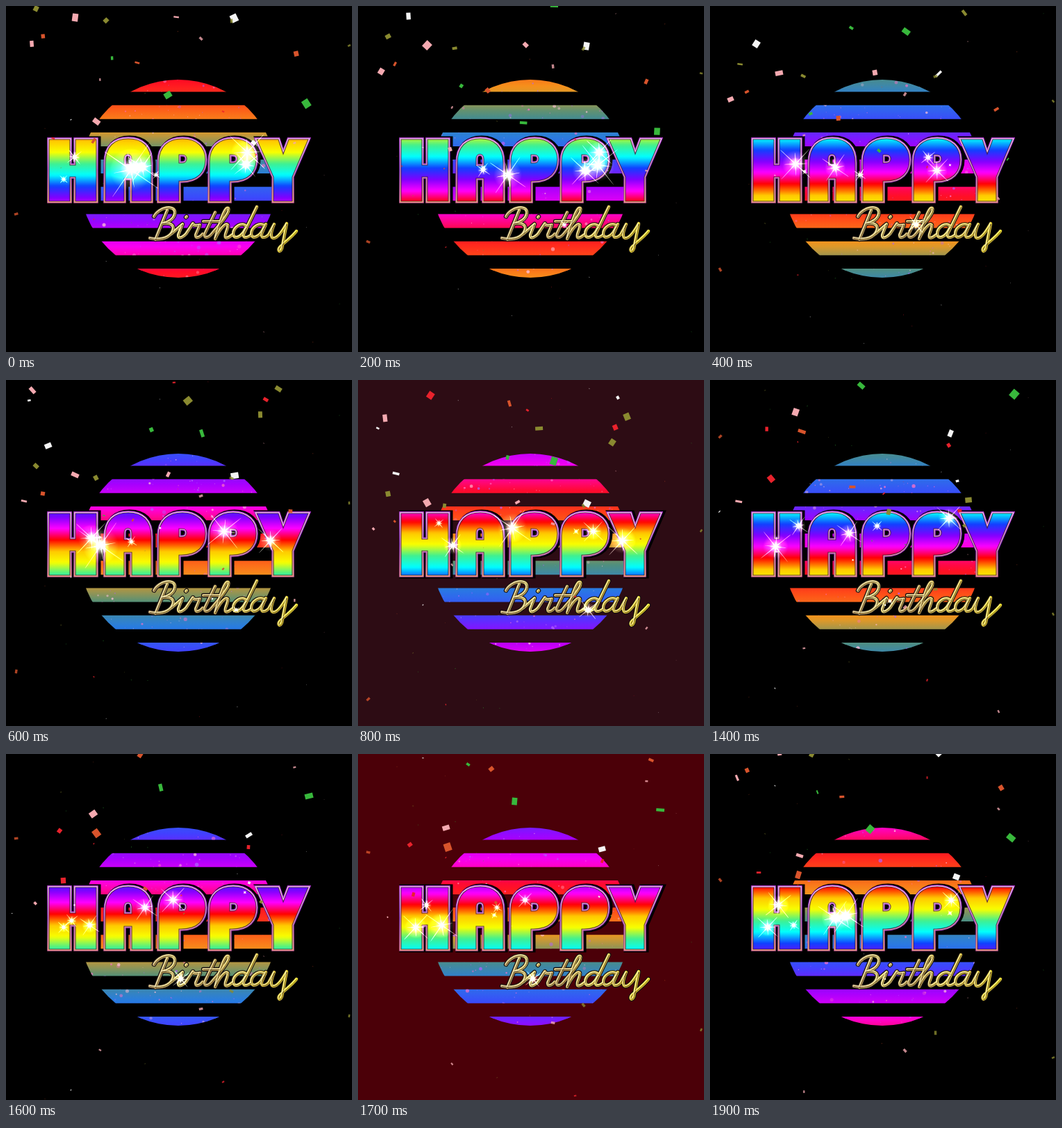
An HTML page with a canvas that plays this animation: 498 px wide and 498 px high, repeating every 2000 ms.

```html
<!DOCTYPE html>
<html lang="en">
<head>
<meta charset="utf-8">
<title>Happy Birthday</title>
<style>
  html, body { margin: 0; width: 100%; height: 100%; overflow: hidden; background: #000; }
  canvas { display: block; }
</style>
</head>
<body>
<canvas id="stage" width="498" height="498" role="img" aria-label="Happy Birthday"></canvas>
<script>
const SIZE = 498, STEP = 100, STEPS = 20, LOOP = STEP * STEPS;
const FALL = 400; // distance a piece of confetti falls in one loop
const ctx = document.getElementById('stage').getContext('2d');
const flashes = { 8: '#2d0c14', 17: '#4b0008' };

// Evenly spaced colours of one full cycle
const sunset = ['#ff0a24', '#ff4a18', '#f59a1c', '#50907a', '#287de1', '#3c44ff', '#a000ff', '#ff00f0'];
const rainbow = ['#ff0000', '#ffc800', '#f8ff00', '#40f090', '#00ffff', '#1040ff', '#8000ff', '#ff00ff'];
const paper = ['#f4a9b0', '#e8222c', '#8a8a30', '#38b83c', '#f4f4f4', '#d8542c'];
const glitter = ['#ff70c8', '#b060ff', '#ffc0d8'];

const happy = new Path2D(
  'M62 281V192H92V229H100V192H130V281H100V246H92V281Z' +
  'M143 281V226C143 202 156 191 176 191S209 202 209 226V281H181V248H170V281Z' +
  'M170 230H181V220C181 211 170 211 170 220Z');
const letterP = new Path2D(
  'M220 281V224C220 202 234 191 254 191S287 203 287 221S276 252 252 252H249V281Z' +
  'M249 226H254C262 226 262 214 254 214H249Z');
happy.addPath(letterP);
happy.addPath(letterP, new DOMMatrix().translate(73, 0));
happy.addPath(new Path2D('M361 192H392L399 213L407 192H435L412 246V281H385V246Z'));

const birthday = new Path2D(
  'M232 294L215 336M213 303C220 289 244 285 243 298C242 307 232 312 225 313' +
  'C240 311 244 318 238 327C232 335 220 337 207 334' +
  'M238 328L254 314L248 329C247 335 252 335 259 328M259 304L260 303' +
  'M259 328L269 313C270 317 275 316 279 315L273 329C272 335 278 334 283 328' +
  'M301 297L286 328C285 335 291 334 296 328M284 310H308' +
  'M296 328C307 315 324 296 320 291C315 287 307 313 301 335C307 322 316 311 319 315' +
  'C321 319 313 330 316 333C319 335 323 331 327 328' +
  'M346 317C340 310 327 318 327 328C328 337 339 333 345 320M361 289L342 328C341 335 347 334 353 329' +
  'M373 317C366 310 353 318 353 328C354 337 366 332 371 319M374 314L368 328C367 335 373 334 378 329' +
  'L386 314C380 328 381 335 386 334C392 333 399 322 404 313L397 349' +
  'C395 356 389 352 395 346C402 339 412 332 418 324');

const fract = v => v - Math.floor(v);

function randomizer(seed) {
  return () => fract(Math.sin(++seed * 12.9898) * 43758.5453);
}

function cycleColor(palette, position) {
  const p = fract(position) * palette.length;
  const i = Math.floor(p), k = p - i;
  const channel = (color, at) => parseInt(color.slice(at, at + 2), 16);
  const from = palette[i], to = palette[(i + 1) % palette.length];
  return `rgb(${[1, 3, 5].map(at => Math.round(channel(from, at) * (1 - k) + channel(to, at) * k))})`;
}

// Vertical slice of a palette that begins at the given phase and covers the given span
function cycleGradient(palette, top, bottom, phase, span) {
  const gradient = ctx.createLinearGradient(0, top, 0, bottom);
  for (let k = 0; k <= 1; k += 1 / 32) {
    gradient.addColorStop(k, cycleColor(palette, phase + span * k));
  }
  return gradient;
}

function linearGradient(x0, y0, x1, y1, colors) {
  const gradient = ctx.createLinearGradient(x0, y0, x1, y1);
  colors.forEach((color, i) => gradient.addColorStop(i / (colors.length - 1), color));
  return gradient;
}

function dot(x, y, radius) {
  ctx.beginPath();
  ctx.arc(x, y, radius, 0, 7);
}

function drawSun(t, frame) {
  const random = randomizer(frame * 977);
  ctx.save();
  ctx.beginPath();
  for (let i = 0; i < 8; i++) ctx.rect(100, 103.5 + i * 39.2, 298, 20);
  ctx.clip();
  dot(248, 248.5, 142.5);
  ctx.clip();
  ctx.fillStyle = cycleGradient(sunset, 106, 391, t / LOOP * 2, 1.03);
  ctx.fillRect(100, 100, 298, 298);
  for (let i = 0; i < 260; i++) {
    ctx.fillStyle = glitter[i % glitter.length];
    ctx.globalAlpha = .3 + random() * .5;
    dot(110 + random() * 276, 106 + random() * 285, .6 + random() ** 4 * 2.2);
    ctx.fill();
  }
  ctx.restore();
}

function drawHappy(t) {
  const outline = (width, style) => {
    ctx.lineWidth = width;
    ctx.strokeStyle = style;
    ctx.stroke(happy);
  };
  ctx.lineJoin = 'miter';
  ctx.save();
  ctx.translate(2, 0);
  outline(9, '#000');
  ctx.restore();
  outline(5.5, linearGradient(0, 188, 0, 284, ['#c040e0', '#7020b0', '#d060a0']));
  outline(3.2, linearGradient(0, 188, 0, 284, ['#ffe8f0', '#e8a0c8', '#ffc870']));
  ctx.fillStyle = cycleGradient(rainbow, 191, 281, .1 + t / LOOP * 2, .69);
  ctx.fill(happy, 'evenodd');
  outline(1.1, 'rgba(50,5,50,.75)');
}

function drawBirthday() {
  const gold = linearGradient(207, 0, 418, 0,
    ['#b89c68', '#e8d878', '#b89a58', '#f0dc60', '#d8c040', '#fff030']);
  const layer = (width, style, shift) => {
    ctx.save();
    ctx.translate(shift, shift);
    ctx.lineWidth = width;
    ctx.strokeStyle = style;
    ctx.stroke(birthday);
    ctx.restore();
  };
  ctx.lineCap = ctx.lineJoin = 'round';
  layer(6.4, '#120c10', 0);
  layer(4.2, gold, 0);
  layer(.9, '#58401c', .6);
  layer(.8, '#fffbd0', -.8);
}

function drawPiece(x, y, size, angle, flip, color) {
  ctx.save();
  ctx.translate(x, y);
  ctx.rotate(angle);
  ctx.fillStyle = color;
  ctx.fillRect(-size / 2, -size * flip / 2, size, size * flip);
  ctx.restore();
}

function drawConfetti(t) {
  const random = randomizer(41);
  const fallen = t / LOOP * FALL;
  for (let i = 0; i < 30; i++) {
    const y = (random() * FALL + fallen) % FALL - 15;
    const x = 30 + random() * 420 + (random() - .5) * y * .3;
    const size = 4 + random() * 8;
    const scale = Math.min(1, (250 - y) / 80);
    const turn = random() * 6 + y / 45;
    if (scale > 0) {
      drawPiece(x, y, size * scale, turn * .7, .3 + .6 * Math.abs(Math.cos(turn)), paper[i % paper.length]);
    }
  }
  // Distant specks
  for (let i = 0; i < 30; i++) {
    const x = random() * SIZE, y = (random() * SIZE + fallen) % SIZE;
    const size = 1 + random() ** 3 * 5;
    ctx.globalAlpha = size > 2 ? .8 : .4;
    drawPiece(x, y, size, i + y / 60, .6, paper[i % paper.length]);
  }
  ctx.globalAlpha = 1;
}

function drawTwinkle(x, y, radius, angle) {
  const glow = ctx.createRadialGradient(x, y, 0, x, y, radius * .65);
  glow.addColorStop(0, '#fff');
  glow.addColorStop(.2, 'rgba(255,255,235,.85)');
  glow.addColorStop(.5, 'rgba(255,240,200,.25)');
  glow.addColorStop(1, 'rgba(255,240,200,0)');
  ctx.fillStyle = glow;
  dot(x, y, radius);
  ctx.fill();
  ctx.fillStyle = 'rgba(255,255,235,.6)';
  for (let ray = 0; ray < 4; ray++) {
    ctx.beginPath();
    ctx.ellipse(x, y, ray % 2 ? radius * .55 : radius, .6, angle + ray * Math.PI / 4, 0, 7);
    ctx.fill();
  }
}

function drawTwinkles(t) {
  const random = randomizer(7), count = 28;
  ctx.save();
  ctx.globalCompositeOperation = 'lighter';
  for (let i = 0; i < count; i++) {
    const onScript = i % 6 === 5;
    const x = onScript ? 215 + random() * 195 : 68 + random() * 340;
    const y = onScript ? 312 + random() * 20 : 198 + random() * 70;
    const radius = onScript ? 18 : 26 + random() * 22;
    const away = Math.abs(fract(t / LOOP - i / count + .5) - .5) * LOOP;
    const power = 1 - away / 270;
    if (power > 0) drawTwinkle(x, y, radius * power, .6 + i % 3 * .15);
  }
  ctx.restore();
}

function render(now) {
  const frame = Math.floor(now / STEP) % STEPS;
  const t = frame * STEP;
  ctx.fillStyle = flashes[frame] || '#000';
  ctx.fillRect(0, 0, SIZE, SIZE);
  drawSun(t, frame);
  drawHappy(t);
  drawBirthday();
  drawConfetti(t);
  drawTwinkles(t);
  requestAnimationFrame(render);
}
requestAnimationFrame(render);
</script>
</body>
</html>
```
